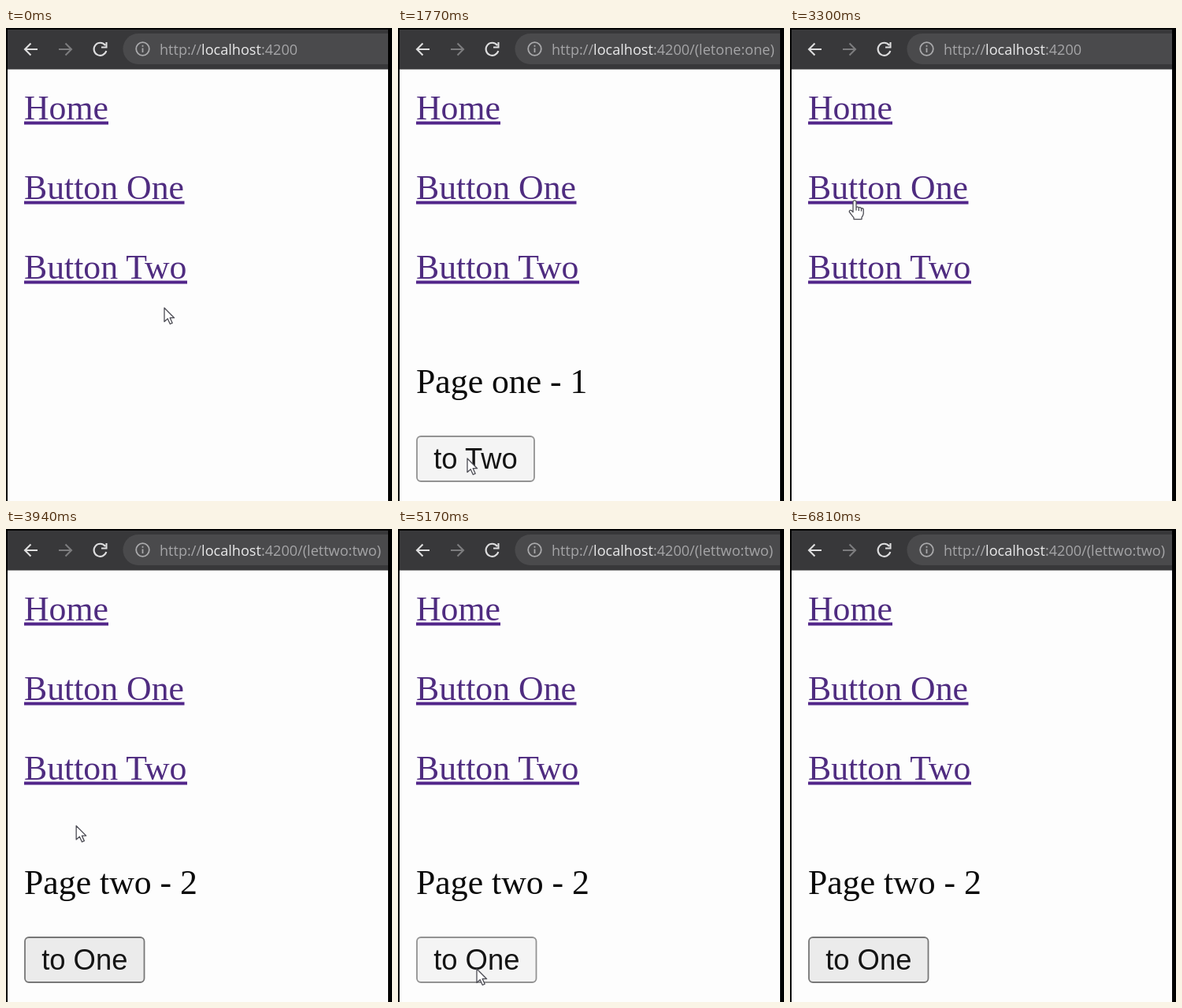
These frames come from a looping animation (490 by 600 pixels, 6850 ms). An HTML page:

```html
<!DOCTYPE html>
<html lang="en">
<head>
<meta charset="utf-8">
<title>Router outlets</title>
<style>
  html, body { margin: 0; width: 100%; height: 100%; overflow: hidden; background: #000; }
  svg { display: block; width: 490px; height: 600px; }
  .serif { font: 43.75px "Liberation Serif", serif; fill: #0a0a0a; }
  .link { fill: #4f2c80; }
  .rule { stroke: #52268a; stroke-width: 4; }
  .label { font: 36.4px "Liberation Sans", sans-serif; fill: #141414; text-anchor: middle; }
  .url { font: 18.1px "Open Sans", sans-serif; fill: #a5a5a7; }
  .icon { fill: none; stroke: #dededf; stroke-width: 2.1; }
  .cursor { fill: #fff; stroke: #4c4c54; stroke-width: 1.3; stroke-linejoin: round; }
</style>
</head>
<body>
<svg viewBox="0 0 490 600">
  <path fill="#fdfdfd" d="M2 52H485V600H2z"/>
  <path fill="#38383a" d="M2 2H485V52.5H2z"/>
  <path fill="#4a4a4c" d="M485 7H168a19.5 19.5 0 0 0 0 39H485z"/>
  <g class="icon">
    <path d="M40 27H24M31.500 19.500 24 27l7.500 7.500"/>
    <path stroke="#7c7c7e" d="M67 27H83M75.500 19.500 83 27l-7.500 7.500"/>
    <path d="M126 22a8 8 0 1 0 1.300 7M127.500 18v6.500H121"/>
    <g stroke="#a9a9ab" stroke-width="1.800">
      <circle cx="173.500" cy="26.500" r="8.300"/>
      <path d="M173.500 25.500V31M173.500 21.800V23.800"/>
    </g>
  </g>
  <text class="url" x="195" y="34">http://<tspan fill="#eaeaeb">localhost</tspan>:4200<tspan id="route"></tspan></text>
  <g id="links"></g>
  <g id="page">
    <text class="serif" id="heading" x="23" y="463"></text>
    <rect id="button" x="24" y="518" height="57" rx="5" stroke-width="1.800"/>
    <text class="label" id="label" y="559"></text>
  </g>
  <g class="cursor" id="cursor">
    <path id="arrow" d="M0 0V17.500L4.200 13.800 7.300 20.500 10.200 19.200 7.200 12.700H12.600z"/>
    <path id="hand" d="M-2 1.500Q0 -1.500 2 1.500V9Q4 7.200 5.300 9.400 7.300 8 8.500 10.300 11 9.500 11.200 12V17Q10.500 20 9 21.500V24H-1V22Q-4 18.500-6.800 14.500-6.500 11.500-3.800 13L-2 15zM2 9V13M5.300 9.400V13.500M8.500 10.300V14"/>
  </g>
</svg>
<script>
const LOOP = 6850;
const $ = id => document.getElementById(id);

// [text, baseline, right edge]
const links = [["Home", 116, 130], ["Button One", 217, 226.5], ["Button Two", 318, 230]];
$("links").innerHTML = links.map(([text, y, right]) =>
  `<text class="serif link" x="23" y="${y}">${text}</text>
   <path class="rule" d="M23 ${y + 4.5}H${right}"/>`).join("");

const pages = {
  home: { route: "" },
  one: { route: "/(letone:one)", heading: "Page one - 1", label: "to Two", width: 149 },
  two: { route: "/(lettwo:two)", heading: "Page two - 2", label: "to One", width: 151.5 }
};

// [time, page shown from then on]
const visits = [[0, "home"], [760, "one"], [3000, "home"], [3620, "two"]];

// [time, x, y] of the pointer tip
const path = [
  [0, 201, 355], [30, 201, 355], [650, 114, 205], [900, 114, 205],
  [1330, 100, 582], [1400, 100, 582], [1700, 88, 546], [2080, 88, 546],
  [2350, 95, 582], [2400, 95, 582], [2950, 78, 118], [3050, 78, 118],
  [3550, 86, 318], [3700, 86, 318], [4450, 99, 558], [5170, 100, 558],
  [5640, 100, 558], [6250, 118, 606], [LOOP, 118, 606]
];

function pointer(t) {
  const i = path.findIndex(p => p[0] > t);
  const [t0, x0, y0] = path[i - 1], [t1, x1, y1] = path[i];
  const u = (t - t0) / (t1 - t0), e = u * u * (3 - 2 * u);
  return [x0 + (x1 - x0) * e, y0 + (y1 - y0) * e];
}

function show(id, on) {
  $(id).style.display = on ? "" : "none";
}

function draw(now) {
  const t = now % LOOP;
  const page = pages[visits.findLast(v => v[0] <= t)[1]];
  const [x, y] = pointer(t);

  $("route").textContent = page.route;
  show("page", page.heading);
  if (page.heading) {
    const hover = x > 24 && x < 24 + page.width && y > 518 && y < 575;
    $("heading").textContent = page.heading;
    $("label").textContent = page.label;
    $("label").setAttribute("x", 24 + page.width / 2);
    $("button").setAttribute("width", page.width);
    $("button").setAttribute("fill", hover ? "#f4f4f4" : "#ebebeb");
    $("button").setAttribute("stroke", hover ? "#939393" : "#777");
  }

  const onLink = links.some(([, base, right]) =>
    x > 23 && x < right && y > base - 39 && y < base + 10);
  show("hand", onLink);
  show("arrow", !onLink);
  $("cursor").setAttribute("transform", `translate(${x} ${y})`);
  requestAnimationFrame(draw);
}
requestAnimationFrame(draw);
</script>
</body>
</html>
```
